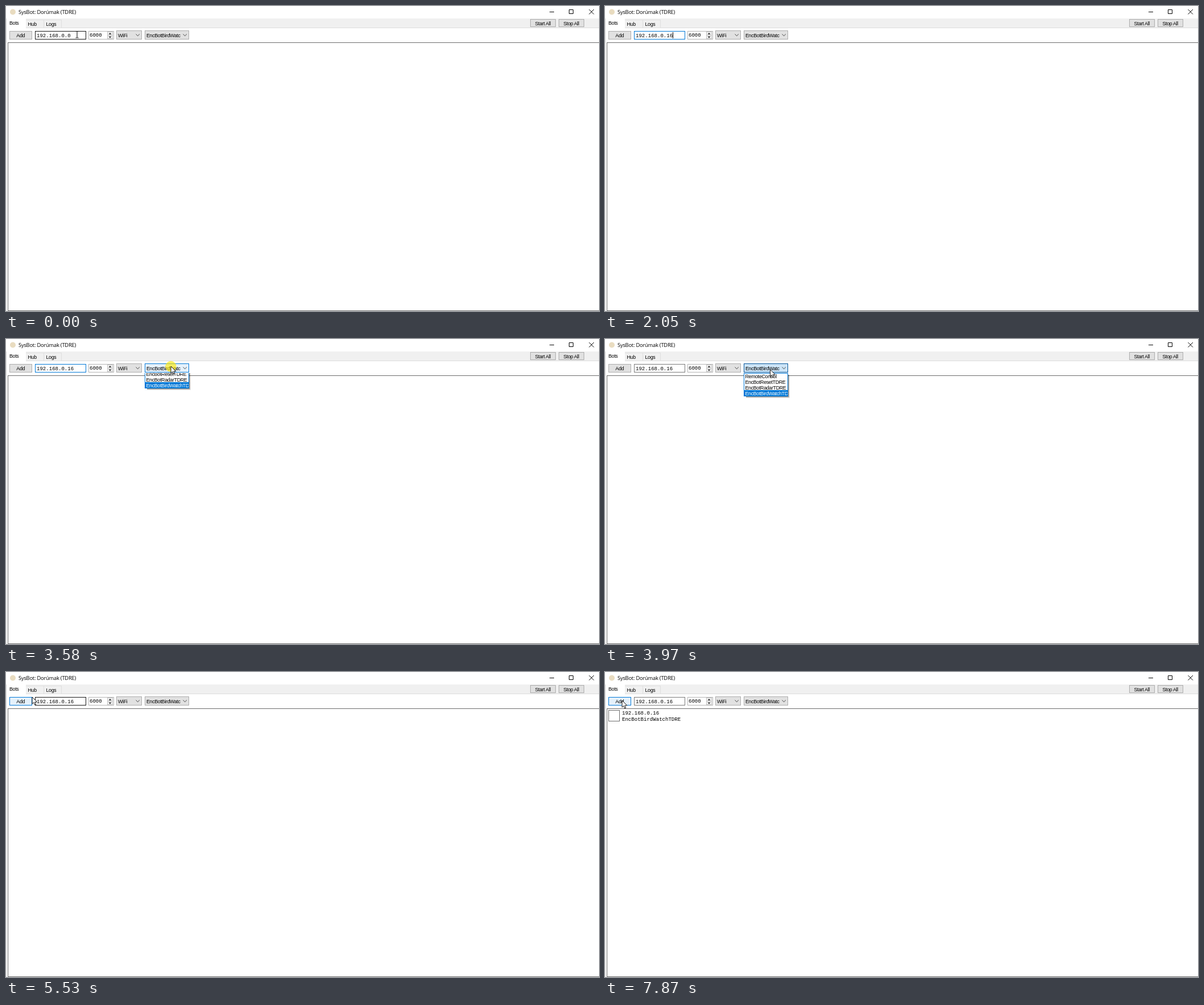
An HTML page that plays this animation: 1043 px wide and 537 px high, repeating every 8000 ms.

```html
<!DOCTYPE html>
<html lang="en">
<head>
<meta charset="utf-8">
<title>Bot manager</title>
<style>
  html, body { margin: 0; width: 100%; height: 100%; overflow: hidden; background: #fff; }
  svg { display: block; }
  text { white-space: pre; fill: #000; }
  .ui { font: 8.9px "Liberation Sans", sans-serif; letter-spacing: -.34px; }
  .mono { font: 9.05px "Liberation Mono", monospace; }
  .title { font: 9.3px "Open Sans", sans-serif; letter-spacing: -.2px; }
</style>
</head>
<body>
<svg id="stage" width="1043" height="537" viewBox="0 0 1043 537"></svg>
<script>
const LOOP = 8000;
const BLUE = '#0078d7';
const stage = document.getElementById('stage');

// Pointer moves: start, end, number of steps, x, y
const moves = [
  [70, 240, 3, 124, 49.5],
  [2580, 2900, 5, 290, 48],
  [3880, 4520, 9, 294, 94],
  [5050, 5530, 7, 46, 44],
  [5610, 5690, 2, 49, 33],
  [5770, 5840, 2, 46, 37],
  [5920, 6070, 3, 21, 50],
  [6930, 7080, 3, 27, 50],
  [7230, 7310, 2, 30, 50]
];
const clicks = [[410, 560], [3500, 3730], [4900, 5050], [7700, 7870]];
const listItems = ['RemoteControl', 'EncBotResetTDRE', 'EncBotRadarTDRE', 'EncBotBirdWatchTDRE'];

const during = (t, a, b) => t >= a && t < b;
const inside = (p, x, y, w, h) => p.x >= x && p.x <= x + w && p.y >= y && p.y <= y + h;

function pointerAt(t) {
  let x = 125, y = 50;
  for (const [start, end, steps, toX, toY] of moves) {
    if (t < start) break;
    const step = Math.floor((t - start) / (end - start) * (steps - 1) + 1.001);
    const k = Math.min(1, step / steps);
    const ease = k * k * (3 - 2 * k);
    x += (toX - x) * ease;
    y += (toY - y) * ease;
  }
  return { x, y };
}

const rect = (x, y, w, h, fill) => `<rect x="${x}" y="${y}" width="${w}" height="${h}" fill="${fill}"/>`;
const box = (x, y, w, h, fill, stroke) =>
  `<rect x="${x + .5}" y="${y + .5}" width="${w - 1}" height="${h - 1}" fill="${fill}" stroke="${stroke}"/>`;
const text = (x, y, s, kind = 'ui', extra = '') => `<text x="${x}" y="${y}" class="${kind}" ${extra}>${s}</text>`;
const line = (d, color = '#000', width = 1) => `<path d="${d}" fill="none" stroke="${color}" stroke-width="${width}"/>`;

// Fill and border of a push button or drop-down
function controlColors(hover, pressed) {
  if (pressed) return ['#cce4f7', '#005499'];
  return hover ? ['#e5f1fb', BLUE] : ['#e1e1e1', '#adadad'];
}

function button(x, y, w, h, label, hover, pressed) {
  return box(x, y, w, h, ...controlColors(hover, pressed)) +
    text(x + w / 2 - .3, y + 11, label, 'ui', 'text-anchor="middle"');
}

function combo(x, w, label, hover, pressed) {
  return box(x, 43, w, 16, ...controlColors(hover, pressed)) + text(x + 3, 54.6, label) +
    line(`M${x + w - 10.5} 49.5l3.2 3.2 3.2-3.2`, '#444');
}

function windowFrame() {
  return rect(0, 0, 1043, 537, '#fff') +
    '<circle cx="12" cy="10.5" r="5" fill="#e9dcc0"/>' +
    text(22, 13.8, 'SysBot: Dorúmak (TDRE)', 'title') +
    line('M956 10.5h8M990.5 6.5h7v7h-7zM1025.5 6l8.5 8.5M1034 6l-8.5 8.5') +
    rect(0, 22, 1043, 17, '#f0f0f0') + rect(0, 38, 1043, 1, '#dcdcdc') +
    box(34, 24, 33, 15, '#f0f0f0', '#dfdfdf') + box(66, 24, 32, 15, '#f0f0f0', '#dfdfdf') +
    rect(0, 22, 35, 17, '#fff') + rect(0, 22, 1, 515, '#dcdcdc') +
    text(6, 33.4, 'Bots') + text(38.5, 34.6, 'Hub') + text(70.5, 34.6, 'Logs') +
    button(922, 23, 45, 14, 'Start All') + button(972, 23, 45, 14, 'Stop All') +
    box(3, 64, 1050, 473, '#fff', '#6c6c6c');
}

function addressField(t, pointer) {
  const value = '192.168.0.' + (t < 1350 ? '0' : t < 1730 ? '' : t < 2050 ? '1' : '16');
  const focused = during(t, 150, 3650);
  const hover = inside(pointer, 52, 44, 88, 15) || during(t, 5450, 5990);
  const caret = during(t, 950, 2580) || during(t, 3050, 3500);
  const caretX = Math.round(53.5 + value.length * 5.43);
  return box(51, 44, 90, 15, '#fff', focused ? BLUE : hover ? '#171717' : '#7a7a7a') +
    text(54, 54.7, value, 'mono') + (caret ? rect(caretX, 46, 1, 11, '#000') : '');
}

function portField() {
  return box(145, 44, 45, 15, '#fff', '#b4b4b4') + text(147, 54.4, '6000', 'mono') +
    box(178, 45, 10, 7, '#f0f0f0', '#c4c4c4') + box(178, 51, 10, 7, '#f0f0f0', '#c4c4c4') +
    '<path d="M180.5 50l2.5-3 2.5 3zM180.5 53.5l2.5 3 2.5-3z" fill="#333"/>';
}

function dropList(t) {
  if (!during(t, 3580, 5050)) return '';
  const shift = t < 3650 ? -14 : 0;
  const rows = listItems.map((label, i) => {
    const selected = i === 3;
    return (selected ? rect(244, 90, 78, 11, BLUE) : '') +
      text(246.5, 68.6 + i * 10, label, 'ui', selected ? 'style="fill:#fff"' : '');
  }).join('');
  return `<svg x="244" y="60" width="82" height="45" viewBox="244 60 82 45"><g transform="translate(0 ${shift})">` +
    rect(248, 63, 77, 41, '#00000018') + rect(248, 63, 75.5, 39.5, '#00000060') +
    box(244, 60, 78, 41, '#fff', BLUE) +
    `<svg x="244" y="60" width="77" height="41" viewBox="244 60 77 41">${rows}</svg></g></svg>`;
}

function botRow() {
  return box(6, 67, 20, 20, '#fff', '#6c6c6c') +
    text(30, 75.4, '192.168.0.16', 'mono') + text(30, 86.2, 'EncBotBirdWatchTDRE', 'mono');
}

function pointerShape(t, p) {
  const click = clicks.some(([a, b]) => during(t, a, b));
  const halo = click ? `<circle cx="${p.x}" cy="${p.y + .5}" r="9.7" fill="#ffe900" fill-opacity=".62"/>` : '';
  if (during(t, 1730, 2580)) return halo;
  const overField = inside(p, 52, 44, 88, 15);
  const shape = overField
    ? line('M-2.5-5.5h2l.5.5.5-.5h2M0-5V5.5M-2.5 6h2l.5-.5.5.5h2')
    : '<path d="M0 0V12.2L2.8 9.6 4.7 14 6.7 13.1 4.8 8.9H8.8Z" fill="#fff" stroke="#000" stroke-width=".9"/>';
  return halo + `<g transform="translate(${p.x} ${p.y})">${shape}</g>`;
}

function scene(t) {
  const p = pointerAt(t);
  const listOpen = during(t, 3650, 5050);
  return windowFrame() +
    button(6, 44, 40, 15, 'Add', inside(p, 6, 44, 40, 15), during(t, 7700, 7870)) +
    addressField(t, p) + portField() +
    combo(194, 45, 'WiFi', inside(p, 194, 43, 45, 16)) +
    combo(244, 78, 'EncBotBirdWatc', inside(p, 244, 43, 78, 16), listOpen) +
    (t >= 7870 ? botRow() : '') + dropList(t) + pointerShape(t, p);
}

let shown = '';
function draw() {
  const next = scene(performance.now() % LOOP);
  if (next !== shown) stage.innerHTML = shown = next;
  requestAnimationFrame(draw);
}
draw();
</script>
</body>
</html>
```
